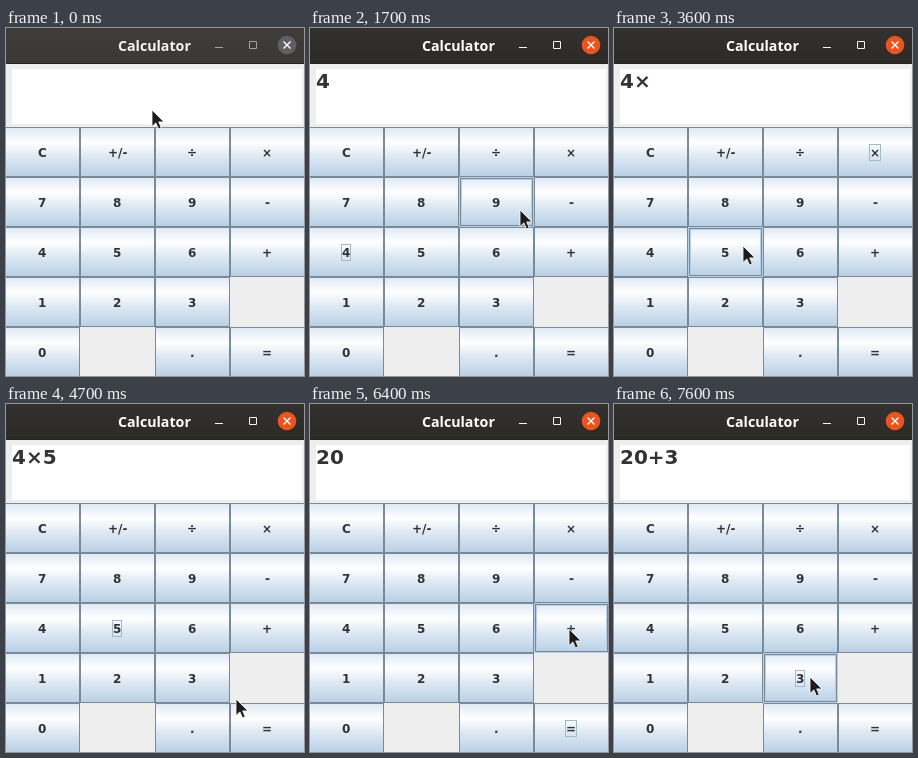
An HTML page for the animation above (8000 ms loop, 298x348 px).

```html
<!DOCTYPE html>
<html lang="en">
<head>
<meta charset="utf-8">
<title>Calculator</title>
<style>
  html, body { margin: 0; width: 100%; height: 100%; overflow: hidden; background: #eee; }
  svg { display: block; width: 298px; height: 348px; }
  text { font-family: "DejaVu Sans", sans-serif; font-weight: bold; fill: #333; white-space: pre; }
  rect { shape-rendering: crispEdges; }

  .bar { fill: url(#idle); }
  .title { font: bold 14.2px "Noto Sans", "Open Sans", sans-serif; fill: #f4f3f0; }
  .sign { fill: none; stroke: #a3a29f; }
  .close { fill: #605f64; }
  .active .bar { fill: url(#live); }
  .active .title { fill: #fff; }
  .active .sign { stroke: #f4f3f0; }
  .active .close { fill: #e95420; }

  .key text { font-size: 12px; }
  .face { fill: url(#face); }
  .line { fill: none; stroke: #7a8a99; }
  .glow { fill: none; stroke: #b8cfe5; }
  .ring { fill: none; stroke: #a3b8cc; visibility: hidden; }
  .over, .down { visibility: hidden; }
  .hover .over, .press .down, .focus .ring { visibility: visible; }
  .hover .edge, .press .edge, .press .over { visibility: hidden; }
  .press .face { fill: #b8cfe5; }
  #out { font-size: 20px; }
</style>
</head>
<body>
<svg viewBox="0 0 298 348" id="app">
  <defs>
    <linearGradient id="face" x2="0" y2="1">
      <stop offset="0" stop-color="#dde8f3"/>
      <stop offset=".3" stop-color="#fff"/>
      <stop offset=".6" stop-color="#dde8f3"/>
      <stop offset="1" stop-color="#b8cfe5"/>
    </linearGradient>
    <linearGradient id="idle" x2="0" y2="1">
      <stop offset="0" stop-color="#3d3c39"/>
      <stop offset="1" stop-color="#3a3936"/>
    </linearGradient>
    <linearGradient id="live" x2="0" y2="1">
      <stop offset="0" stop-color="#32312d"/>
      <stop offset="1" stop-color="#2b2a26"/>
    </linearGradient>
  </defs>
  <rect width="298" height="348" fill="#eee"/>
  <rect class="bar" width="298" height="36"/>
  <rect y="35" width="298" height="1" fill="#242320"/>
  <text class="title" x="112" y="23">Calculator</text>
  <path class="sign" d="M209 19.5h8M243.500 13.500h7v7h-7z"/>
  <circle class="close" cx="281" cy="17" r="9.300"/>
  <path d="M277.500 13.500l7 7m0-7l-7 7" stroke="#fff" stroke-width="1.400"/>
  <rect x="6" y="41" width="290" height="55" fill="#fff"/>
  <text id="out" x="6" y="60"></text>
  <g id="keys"></g>
  <path id="arrow" d="M0 0V16.500L3.900 12.900L6.500 18.900L9.200 17.700L6.700 11.900H12Z"
        fill="#1c1c1c" stroke="#fff" stroke-width=".8" stroke-linejoin="round"/>
</svg>
<script>
const W = 75, H = 50, LOOP = 8000, TICK = 100;
const rows = [
  ['C', '+/-', '÷', '×'],
  ['7', '8', '9', '-'],
  ['4', '5', '6', '+'],
  ['1', '2', '3', ''],
  ['0', '', '.', '=']
];
// label widths in whole pixels; digits are 8
const widths = { C: 9, '+/-': 19, '÷': 10, '×': 10, '+': 10, '=': 10, '-': 5, '.': 5 };

const ease = {
  line: p => p,
  both: p => p * p * (3 - 2 * p),
  enter: p => p * (0.5 + 0.5 * p),
  leave: p => 1 - Math.pow(1 - p, 2)
};

// pointer path: time, x, y, easing of the way there
const path = [
  [0, 146, 82],
  [700, 37, 221, 'both'],
  [1100, 37, 221],
  [1700, 210, 182, 'enter'],
  [1800, 239, 162],
  [1900, 264, 140],
  [2100, 264, 140],
  [2200, 269, 134],
  [2800, 269, 134],
  [3600, 129, 218, 'both'],
  [4300, 129, 218],
  [4700, 230, 295, 'enter'],
  [5100, 260, 319, 'leave'],
  [5900, 260, 319],
  [6400, 259, 225, 'both'],
  [6700, 259, 225],
  [6900, 230, 253, 'enter'],
  [7300, 196, 273, 'leave'],
  [LOOP, 196, 273]
];

const presses = [
  { key: '4', down: 1000, focus: 1000, up: 1100, show: '4' },
  { key: '×', down: 2500, focus: 2500, up: 2600, show: '4×' },
  { key: '5', down: 3900, focus: 4000, up: 4200, show: '4×5' },
  { key: '=', down: 5400, focus: 5400, up: 5500, show: '20' },
  { key: '+', down: 6500, focus: 6500, up: 6600, show: '20+' },
  { key: '3', down: 7500, focus: 7500, up: 7600, show: '20+3' }
];

const $ = id => document.getElementById(id);
const app = $('app'), out = $('out'), arrow = $('arrow');

const box = (cls, x, y, w, h) =>
  `<rect class="${cls}" x="${x + 0.5}" y="${y + 0.5}" width="${w - 1}" height="${h - 1}"/>`;
const inset = (cls, x, y, d) => box(cls, x + d, y + d, W - 2 * d, H - 2 * d);

function drawKey(label, x, y) {
  const w = widths[label] || 8;
  const tx = x + 37 - Math.floor(w / 2);
  return `<g class="key">
    <rect class="face" x="${x}" y="${y}" width="${W}" height="${H}"/>
    ${inset('line edge', x, y, 0)}
    <g class="over">${inset('glow', x, y, 0)}${inset('line', x, y, 1)}${inset('glow', x, y, 2)}</g>
    <g class="down">${inset('line', x, y, 0)}
      <path d="M${x + 1.5} ${y + H - 1}V${y + 1.5}H${x + W - 1}" class="line"/></g>
    <text x="${tx}" y="${y + 30}">${label}</text>
    ${box('ring', tx - 1, y + 17, w + 2, 17)}
  </g>`;
}

const keys = [];
rows.forEach((row, r) => row.forEach((label, c) => {
  if (label) keys.push({ label, x: c * W - 1, y: 99 + r * H });
}));
$('keys').innerHTML = keys.map(k => drawKey(k.label, k.x, k.y)).join('');
keys.forEach((k, i) => { k.el = $('keys').children[i]; });

function pointer(t) {
  const i = path.findIndex(p => p[0] > t);
  const [t0, x0, y0] = path[i - 1];
  const [t1, x1, y1, e = 'line'] = path[i];
  const p = ease[e]((t - t0) / (t1 - t0));
  return [Math.round(x0 + (x1 - x0) * p), Math.round(y0 + (y1 - y0) * p)];
}

function render(t) {
  const [x, y] = pointer(t);
  let show = '', held = '', focus = '';
  for (const p of presses) {
    if (t >= p.focus) focus = p.key;
    if (t >= p.up) show = p.show;
    if (t >= p.down && t < p.up) held = p.key;
  }
  app.classList.toggle('active', t >= presses[0].down);
  out.textContent = show;
  arrow.setAttribute('transform', `translate(${x} ${y})`);
  for (const k of keys) {
    const over = x >= k.x && x < k.x + W && y >= k.y && y < k.y + H;
    k.el.classList.toggle('hover', over);
    k.el.classList.toggle('press', k.label === held);
    k.el.classList.toggle('focus', k.label === focus);
  }
}

const start = performance.now();
let last = -1;
function frame() {
  const t = Math.floor((performance.now() - start) % LOOP / TICK) * TICK;
  if (t !== last) render(last = t);
  requestAnimationFrame(frame);
}
frame();
</script>
</body>
</html>
```
